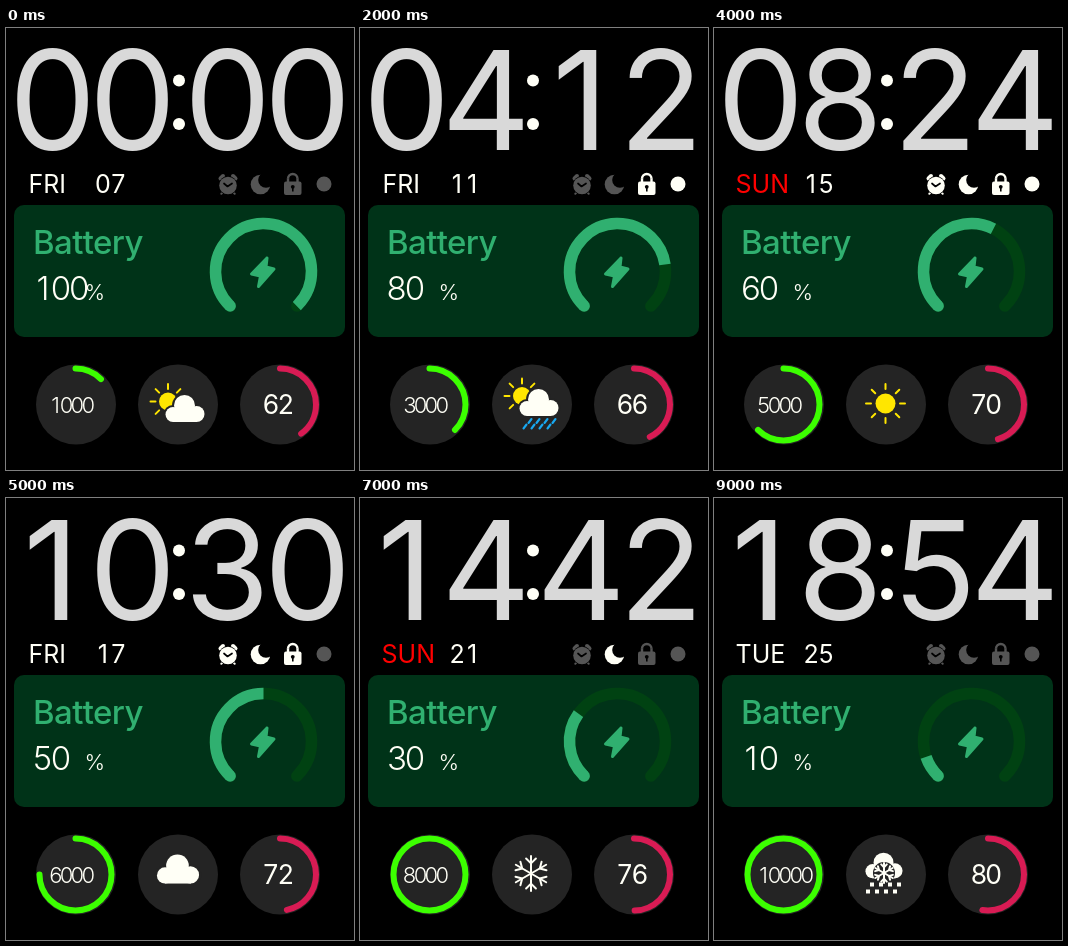
These frames come from a looping animation (348 px wide and 442 px high, 10000 ms). An HTML page with a canvas:

```html
<!DOCTYPE html>
<html lang="en">
<head>
<meta charset="utf-8">
<title>Watch face</title>
<style>
  html, body { margin: 0; width: 100%; height: 100%; overflow: hidden; background: #000; }
  canvas { display: block; width: 348px; height: 442px; }
</style>
</head>
<body>
<canvas id="face"></canvas>
<script>
const W = 348, H = 442, STEP_MS = 1000, STEPS = 10;
const WHITE = '#fffff6', OFF = '#555', DISC = '#242424', GREEN = '#30b070';
const SUN_YELLOW = '#ffe600', RAIN_BLUE = '#18a8f0';
const WEEKDAYS = ['FRI', 'WED', 'FRI', 'WED', 'SUN', 'FRI', 'TUE', 'SUN', 'FRI', 'TUE'];

const canvas = document.getElementById('face');
const ctx = canvas.getContext('2d');
const ratio = window.devicePixelRatio || 1;
canvas.width = W * ratio;
canvas.height = H * ratio;

const pad = n => String(n).padStart(2, '0');
const rad = deg => (deg - 90) * Math.PI / 180;

// Aligns by the visible ink: align 0 = left edge, 0.5 = centre.
function text(str, x, y, { size, weight = 400, color = WHITE, spacing = 0, align = 0 }) {
  ctx.font = `${weight} ${size}px Inter, Roboto, sans-serif`;
  ctx.letterSpacing = spacing + 'px';
  ctx.fillStyle = color;
  const { actualBoundingBoxLeft: left, actualBoundingBoxRight: right } = ctx.measureText(str);
  ctx.fillText(str, x + left - (left + right) * align, y);
}

// Digits stand in cells of equal pitch; x is the centre of the first cell.
function digits(str, x, y, pitch, style) {
  [...str].forEach((d, i) => {
    const nudge = d === '1' ? style.size * 0.03 : 0;
    text(d, x + i * pitch - nudge, y, { ...style, align: 0.5 });
  });
}

function disc(x, y, r, color) {
  ctx.fillStyle = color;
  ctx.beginPath();
  ctx.arc(x, y, r, 0, Math.PI * 2);
  ctx.fill();
}

function box(x, y, w, h, r, color) {
  ctx.fillStyle = color;
  ctx.beginPath();
  ctx.roundRect(x, y, w, h, r);
  ctx.fill();
}

function arc(x, y, r, from, to, width, color, cap = 'round') {
  ctx.strokeStyle = color;
  ctx.lineWidth = width;
  ctx.lineCap = cap;
  ctx.beginPath();
  ctx.arc(x, y, r, rad(from), rad(to));
  ctx.stroke();
}

function line(points, width, color, cap = 'round') {
  ctx.strokeStyle = color;
  ctx.lineWidth = width;
  ctx.lineCap = cap;
  ctx.lineJoin = 'round';
  ctx.beginPath();
  points.forEach(([x, y]) => ctx.lineTo(x, y));
  ctx.stroke();
}

function at(x, y, draw, scale = 1) {
  ctx.save();
  ctx.translate(x, y);
  ctx.scale(scale, scale);
  draw();
  ctx.restore();
}

function sun(x, y, r, inner, outer) {
  disc(x, y, r, SUN_YELLOW);
  for (let i = 0; i < 8; i++) {
    const c = Math.cos(i * Math.PI / 4), s = Math.sin(i * Math.PI / 4);
    line([[x + c * inner, y + s * inner], [x + c * outer, y + s * outer]], 2, SUN_YELLOW);
  }
}

function cloudShape(grow, color) {
  disc(-0.5, -3.5, 10.5 + grow, color);
  disc(-12, 5.5, 7.5 + grow, color);
  disc(11.5, 5, 8 + grow, color);
  box(-12 - grow, 2 - grow, 24 + 2 * grow, 11 + 2 * grow, 0, color);
}

function cloud(x, y, scale = 1) {
  at(x, y, () => {
    cloudShape(2, DISC);
    cloudShape(0, WHITE);
  }, scale);
}

function flake(x, y, r, width) {
  for (let i = 0; i < 6; i++) {
    at(x, y, () => {
      ctx.rotate(i * Math.PI / 3);
      line([[0, 0], [0, -r]], width, WHITE);
      line([[-r * 0.28, -r * 0.86], [0, -r * 0.58], [r * 0.28, -r * 0.86]], width, WHITE);
    });
  }
}

function rain(x, y, perRow) {
  for (let row = 0; row < 2; row++)
    for (let i = 0; i < perRow; i++) {
      const px = x + i * 8 - row * 5, py = y + row * 5.5;
      line([[px - 1.5, py + 2], [px + 1.5, py - 2]], 2.1, RAIN_BLUE);
    }
}

function snowCloud(x, y) {
  cloud(x, y, 0.95);
  disc(x, y + 7, 11, DISC);
  flake(x, y + 7, 10, 2);
  for (let row = 0; row < 2; row++)
    for (let i = 0; i < 4; i++)
      box(x - 14 + i * 9 - row * 4, y + 16.5 + row * 7, 4, 4, 0, WHITE);
}

const partlyCloudy = () => { sun(162, 373.5, 9, 12.5, 17.5); cloud(179, 381); };
const WEATHER = [
  partlyCloudy,
  partlyCloudy,
  () => { sun(162, 368, 9, 12.5, 17.5); cloud(179, 375); rain(170, 393, 4); },
  () => { sun(160, 366, 9, 12.5, 17.5); snowCloud(177, 374); },
  () => sun(171.5, 375.5, 10, 14.5, 19.5),
  () => cloud(172, 371.5, 1.08),
  () => { cloud(172, 369); rain(167, 387, 3); },
  () => flake(171, 375.5, 17.5, 2),
  () => { cloud(172, 369); rain(163, 387, 4); },
  () => snowCloud(170, 368)
];

function alarm(color) {
  line([[214.5, 150.5], [217, 148]], 4, color);
  line([[229.5, 150.5], [227, 148]], 4, color);
  line([[216.5, 164.5], [215.3, 165.7]], 2, color);
  line([[227.5, 164.5], [228.7, 165.7]], 2, color);
  disc(222, 157.5, 9.4, '#000');
  disc(222, 157.5, 8.8, color);
  line([[218, 155.5], [221.5, 158.5], [226, 155.5]], 1.7, '#000');
}

function moon(color) {
  disc(254.5, 156.5, 9.8, color);
  disc(260, 152, 7.8, '#000');
}

function lock(color) {
  box(278, 153.5, 17.5, 13.5, 2, color);
  line([[282, 154], [282, 150.5]], 2.4, color, 'butt');
  line([[291.5, 154], [291.5, 150.5]], 2.4, color, 'butt');
  arc(286.75, 150.8, 4.75, -90, 90, 2.4, color, 'butt');
  disc(286.75, 158.8, 1.9, '#000');
  box(286, 159, 1.6, 4.5, 0, '#000');
}

const wireless = color => disc(318, 156, 7.5, color);

// Each status light stays on for four steps.
const STATUS = [[alarm, 3], [moon, 4], [lock, 2], [wireless, 1]];

function drawTime(step) {
  const style = { size: 138, color: '#d9d9d9' };
  digits(pad(step * 2), 46.5, 121.5, 80, style);
  digits(pad(step * 6), 221.5, 121.5, 80, style);
  disc(173, 52.5, 6, WHITE);
  disc(173, 96, 6, WHITE);
}

function drawDate(step) {
  const day = WEEKDAYS[step];
  text(day, day === 'FRI' ? 24.5 : 22.5, 165, { size: 25, color: day === 'SUN' ? '#f00' : WHITE });
  digits(pad(7 + step * 2), 97, 165, 15.3, { size: 25 });
  STATUS.forEach(([icon, first]) => icon(step >= first && step < first + 4 ? WHITE : OFF));
}

function drawBattery(step) {
  const level = 100 - step * 10, cx = 257.5, cy = 243.5, r = 48, half = 136;
  box(8, 177, 331, 132, 10, '#003318');
  text('Battery', 29, 226.3, { size: 33, weight: 500, color: GREEN, spacing: -0.6 });
  digits(String(level), 37, 272, 18.3, { size: 33, weight: 300 });
  text('%', 80.5, 272, { size: 22, weight: 300 });
  arc(cx, cy, r, -half, half, 11.5, '#004212');
  arc(cx, cy, r, -half, -half + 2 * half * level / 100, 11.5, GREEN, 'butt');
  const start = rad(-half);
  disc(cx + r * Math.cos(start), cy + r * Math.sin(start), 5.75, GREEN);
  const bolt = [[261, 230], [245.5, 246], [254.5, 248], [252.5, 258.5], [268, 241], [260, 239], [261, 230]];
  line(bolt, 3, GREEN);
  ctx.fillStyle = GREEN;
  ctx.fill();
}

function drawDials(step) {
  const walked = (step + 1) * 1000, pulse = 62 + step * 2;
  [70, 172, 274].forEach(x => disc(x, 376.5, 40, DISC));
  arc(69.5, 376.5, 36, 0, Math.min(360, walked * 360 / 8000), 6, '#3cff00');
  digits(String(walked), 49.8, 385, 10.9, { size: 22, weight: 300 });
  WEATHER[step]();
  arc(274, 376.5, 36, 0, 144 + 2.5 * (pulse - 62), 6, '#d81b54');
  digits(String(pulse), 264.7, 386, 15, { size: 26.5 });
}

function draw(step) {
  ctx.setTransform(ratio, 0, 0, ratio, 0, 0);
  ctx.fillStyle = '#000';
  ctx.fillRect(0, 0, W, H);
  [drawTime, drawDate, drawBattery, drawDials].forEach(part => part(step));
}

let start, shown;
function tick(now) {
  start ??= now;
  const step = Math.floor((now - start) / STEP_MS) % STEPS;
  if (step !== shown) draw(shown = step);
  requestAnimationFrame(tick);
}
draw(shown = 0);
requestAnimationFrame(tick);
</script>
</body>
</html>
```
